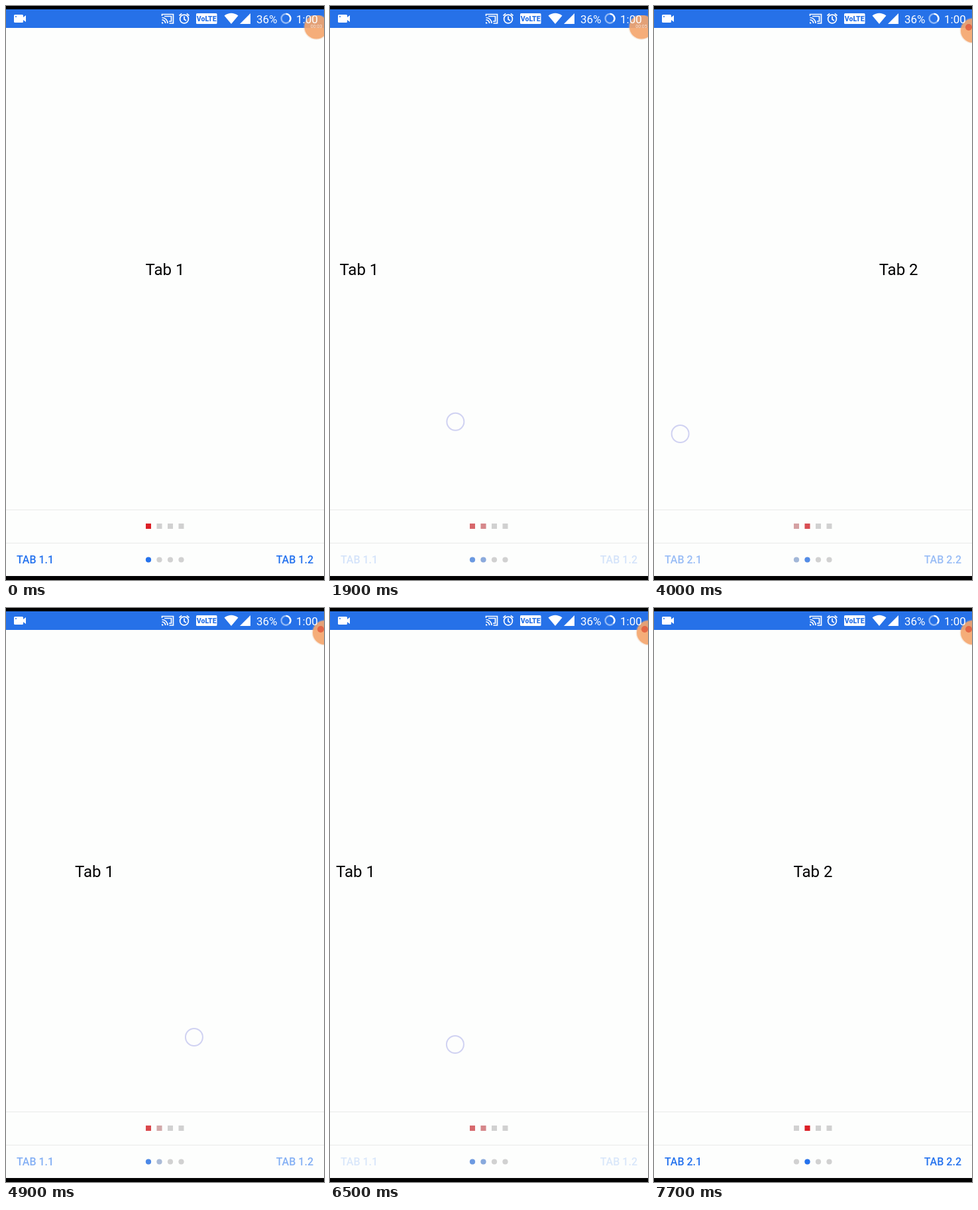
An HTML page for the animation above (8000 ms loop, 480 by 864 pixels).

```html
<!DOCTYPE html>
<html lang="en">
<head>
<meta charset="utf-8">
<title>Tab pager</title>
<style>
html, body { margin: 0; width: 100%; height: 100%; overflow: hidden; background: #fdfefd; }
svg { display: block; width: 480px; height: 864px; font-family: Roboto, sans-serif; }
.tab { font-size: 24px; text-anchor: middle; }
.btn { font-size: 16px; font-weight: 500; fill: #2472ee; }
.end { text-anchor: end; }
</style>
</head>
<body>
<svg viewBox="0 0 480 864">
  <rect width="480" height="864" fill="#fdfefd"/>
  <rect y="5" width="480" height="28" fill="#2671e8"/>
  <rect width="480" height="5"/>

  <g id="bubble">
    <circle r="19.5" fill="#e8b48c" opacity=".3"/>
    <circle r="18" fill="#f5a56c" opacity=".88"/>
    <circle id="mark" cx="-6" cy="-5" r="5" fill="#e2583a" opacity=".8"/>
    <text id="timer" y="1.5" font-size="7" text-anchor="middle" fill="#fbe3d2"></text>
  </g>
  <rect y="5" x="440" width="40" height="9" fill="#2671e8"/>

  <g fill="#fff">
    <path d="M13.500 13h11q1.500 0 1.500 1.500v2.500l4-3v10l-4-3v2.500q0 1.500-1.500 1.500h-11q-1.500 0-1.500-1.500v-9q0-1.500 1.500-1.500z"/>
    <circle cx="15" cy="16" r="1" fill="#2671e8"/>
    <g fill="none" stroke="#fff" stroke-width="1.700">
      <path d="M235.500 15v-2.500h17v13.500h-6M235.500 17.500a8.500 8.500 0 0 1 8.500 8.500M235.500 20.800a5.200 5.200 0 0 1 5.200 5.200"/>
      <path d="M239 15.500h10.500v7.500h-3.500"/>
      <circle cx="269" cy="19.500" r="6.400"/>
      <path d="M269 15.500v4.500l3 2M261.500 14.500l3.700-3.200M276.500 14.500l-3.700-3.200"/>
    </g>
    <path d="M235 24v2.500h2.500a2.500 2.500 0 0 0-2.500-2.500z"/>
    <rect x="287" y="11" width="31.500" height="16" rx="1.500"/>
    <text x="302.700" y="23" font-size="10.500" font-weight="900" text-anchor="middle" fill="#2671e8">VoLTE</text>
    <path d="M329.500 14.500q10.500-7.500 21 0l-10.500 12.500z"/>
    <path d="M353 27h16v-16z"/>
    <circle cx="422.500" cy="18.800" r="6.900" fill="none" stroke="#8fb7f5" stroke-width="2.400"/>
    <path d="M422.500 11.900a6.900 6.900 0 0 1 5.300 11.300" fill="none" stroke="#fff" stroke-width="2.400"/>
    <text x="378" y="26" font-size="17">36%</text>
    <text x="438" y="26" font-size="17">1:00</text>
  </g>

  <text id="one" class="tab" y="405">Tab 1</text>
  <text id="two" class="tab" y="405">Tab 2</text>

  <path d="M0 758.500h480M0 808.500h480" stroke="#e9eae9"/>
  <g id="dots"></g>
  <text id="left" class="btn" x="16" y="839"></text>
  <text id="right" class="btn end" x="464" y="839"></text>
  <circle id="touch" r="13" fill="none" stroke="#d0d2f2" stroke-width="2"/>
  <rect y="858" width="480" height="6"/>
</svg>
<script>
const LOOP = 8000, STEP = 100, LIFT = 6850;
const $ = id => document.getElementById(id);

// [ms, page position]
const pages = [
  [500, 0], [1100, .167], [1700, .345], [2200, .51], [2700, .7], [3300, .755],
  [3800, .745], [3900, .745], [4000, .731], [4900, .222], [5700, .1], [5800, .1],
  [6500, .42], [6700, .57], [6850, .77], [7050, .91], [7300, .98], [7600, 1]
];
// [ms, height of the finger]
const heights = [[500, 596], [1100, 605], [2700, 641], [4000, 644], [4900, 646], [6500, 657], [6850, 660]];
const starts = [[500, 384], [1100, 385], [2700, 386], [4000, 390.5], [6850, 390.5]];

const slope = (a, b) => (b[1] - a[1]) / (b[0] - a[0]);

// monotone cubic curve through the keys
function curve(keys, t) {
  const last = keys.length - 1;
  if (t <= keys[0][0]) return keys[0][1];
  if (t >= keys[last][0]) return keys[last][1];
  const tangent = i => {
    if (i === 0 || i === last) return 0;
    const a = slope(keys[i - 1], keys[i]), b = slope(keys[i], keys[i + 1]);
    return a * b <= 0 ? 0 : 2 * a * b / (a + b);
  };
  const i = keys.findIndex(k => k[0] > t) - 1;
  const [t0, v0] = keys[i], [t1, v1] = keys[i + 1];
  const d = t1 - t0, u = (t - t0) / d, s = u * u * (3 - 2 * u);
  return v0 + (v1 - v0) * s + d * u * (1 - u) * ((1 - u) * tangent(i) - u * tangent(i + 1));
}

function make(name, attrs) {
  const el = document.createElementNS("http://www.w3.org/2000/svg", name);
  for (const k in attrs) el.setAttribute(k, attrs[k]);
  return $("dots").appendChild(el);
}

const set = (id, attrs) => { for (const k in attrs) $(id).setAttribute(k, attrs[k]); };

const marks = [0, 1, 2, 3].map(i => {
  const x = 215 + i * 16.5;
  const square = fill => make("rect", { x: x - 4, y: 779, width: 8, height: 8, fill });
  const dot = fill => make("circle", { cx: x, cy: 833.5, r: 4.1, fill });
  square("#d1d1d1");
  dot("#d1d1d1");
  return [square("#dc1f26"), dot("#2472ee")];
});

function draw(now) {
  const t = Math.floor(now % LOOP / STEP) * STEP;
  const p = curve(pages, t);

  set("one", { x: 240 - 480 * p });
  set("two", { x: 720 - 480 * p });
  marks.forEach((pair, i) => pair.forEach(el =>
    el.setAttribute("opacity", Math.max(0, 1 - Math.abs(i - p)))));

  const page = p < .5 ? 1 : 2;
  $("left").textContent = `TAB ${page}.1`;
  $("right").textContent = `TAB ${page}.2`;
  const fade = Math.abs(1 - 2 * p);
  set("left", { opacity: fade });
  set("right", { opacity: fade });

  set("touch", {
    cx: curve(starts, t) - 480 * p,
    cy: curve(heights, t),
    visibility: t >= 500 && t < LIFT ? "visible" : "hidden"
  });

  const docked = t >= 3000;
  const x = docked ? 481 : t < 100 ? 468.5 : t < 300 ? 469 : 470;
  set("bubble", { transform: `translate(${x} ${docked ? 37 : 31.5})` });
  set("mark", { visibility: docked ? "visible" : "hidden" });
  set("timer", { visibility: docked ? "hidden" : "visible" });
  $("timer").textContent = "00:0" + (3 + Math.floor((t + 400) / 1000));
}

const begin = performance.now();
function tick() {
  draw(performance.now() - begin);
  requestAnimationFrame(tick);
}
tick();
</script>
</body>
</html>
```
